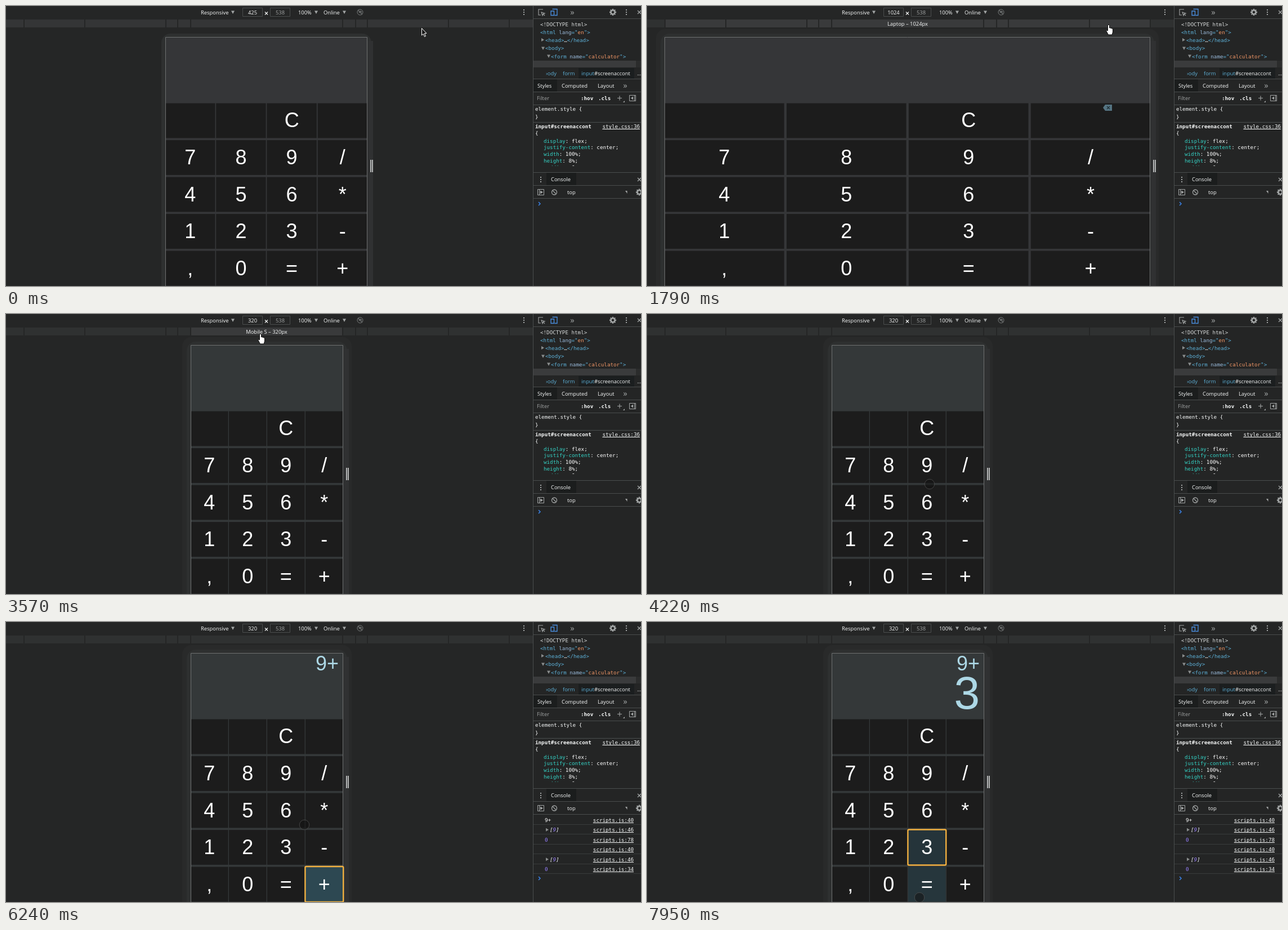
Write an HTML page with a canvas that moves like this. It is 1128x497 px and loops after 8000 ms.

```html
<!DOCTYPE html>
<html lang="en">
<head>
<meta charset="utf-8">
<title>Responsive calculator</title>
<style>
html, body { margin: 0; width: 100%; height: 100%; overflow: hidden; background: #242525; }
canvas { display: block; }
</style>
</head>
<body>
<canvas id="stage" width="1128" height="497"></canvas>
<script>
const ctx = document.getElementById('stage').getContext('2d');
const LOOP = 8000;
const UI = '9.4px "Open Sans", sans-serif';
const MONO = '9.23px "DejaVu Sans Mono", monospace';
const CALC = '36px "Liberation Sans", Arial, sans-serif';
const LINE = '#4a4d4d', GREY = '#a2a5a5', LIGHT = '#f8fafa';
const CENTER = 463, SCALE = 0.842;

// ---- timeline: each value holds until the next entry ----
const pointer = [
  [0, 'arrow', 738, 39], [130, 'hand', 758, 35], [250, 'hand', 778, 33], [390, 'arrow', 826, 25],
  [530, 'arrow', 826, 24], [830, 'hand', 826, 24], [980, 'hand', 825, 30], [1110, 'hand', 823, 35],
  [1360, 'hand', 820, 33], [2060, 'hand', 811, 34], [2200, 'arrow', 710, 44], [2330, 'arrow', 570, 49],
  [2460, 'arrow', 478, 50], [2600, 'arrow', 477, 51], [2750, 'arrow', 464, 44], [2880, 'hand', 454, 36],
  [3010, 'hand', 452, 35], [3830, 'touch', 466, 90], [3960, 'touch', 483, 190], [4090, 'touch', 497, 270],
  [4220, 'touch', 502, 302], [4480, 'touch', 502, 294], [4610, 'touch', 503, 286], [4740, 'touch', 503, 283],
  [5020, 'touch', 581, 398], [5160, 'touch', 587, 440], [5290, 'touch', 580, 475], [5700, 'touch', 579, 474],
  [5980, 'touch', 560, 464], [6120, 'touch', 530, 360], [6250, 'touch', 497, 264], [6370, 'touch', 500, 385],
  [6770, 'touch', 504, 398], [7170, 'touch', 503, 420], [7300, 'touch', 496, 455], [7420, 'touch', 488, 479],
  [7550, 'touch', 484, 489]
];
const viewport = [[0, 425], [1790, 1024], [3570, 320]];
const label = [[0, ''], [130, 'Tablet – 768px'], [390, ''], [980, 'Laptop – 1024px'], [2200, ''],
  [2880, 'Mobile S – 320px'], [3830, '']];
const focus = [[0, ''], [5020, '9'], [5980, '+'], [6910, '3']];
const big = [[0, ''], [5020, '9'], [5980, ''], [6910, '3']];
const hover = {
  '9': [[0, 0], [4880, 0.6], [5020, 1], [5840, 0.5], [5980, 0]],
  '+': [[0, 0], [5840, 0.5], [5980, 1], [6650, 0.5], [6770, 0.15], [6910, 0]],
  '3': [[0, 0], [6650, 0.5], [6770, 0.85], [6910, 1], [7950, 0.55]],
  '=': [[0, 0], [7950, 0.6]]
};
const at = (track, t) => track.findLast(entry => entry[0] <= t);

// ---- drawing helpers ----
function rect(x, y, w, h, color) {
  ctx.fillStyle = color;
  ctx.fillRect(x, y, w, h);
}
function box(x, y, w, h, color, lineWidth = 1, radius = 0) {
  ctx.strokeStyle = color;
  ctx.lineWidth = lineWidth;
  ctx.beginPath();
  ctx.roundRect(x, y, w, h, radius);
  ctx.stroke();
}
function text(s, x, y, color = LIGHT, font = UI, align = 'left') {
  ctx.font = font;
  ctx.fillStyle = color;
  ctx.textAlign = align;
  ctx.fillText(s, x, Math.round(y));
}
function spans(x, y, ...parts) {
  for (const [s, color, style = ''] of parts) {
    text(s, x, y, color, style + MONO);
    x += ctx.measureText(s).width;
  }
}
function link(s, right, y) {
  text(s, right, y, LIGHT, MONO, 'right');
  const w = ctx.measureText(s).width;
  rect(right - w, Math.round(y) + 1, w, 1, LIGHT);
}
function stroke(d, x, y, color = GREY, width = 1.1) {
  ctx.save();
  ctx.translate(x, y);
  ctx.strokeStyle = color;
  ctx.lineWidth = width;
  ctx.stroke(new Path2D(d));
  ctx.restore();
}
function shape(d, x, y, fill, outline) {
  ctx.save();
  ctx.translate(x, y);
  const path = new Path2D(d);
  ctx.fillStyle = fill;
  ctx.fill(path);
  if (outline) {
    ctx.strokeStyle = outline;
    ctx.lineWidth = 1;
    ctx.stroke(path);
  }
  ctx.restore();
}
const down = (x, y, color = GREY) => shape('M-3-2.5H3L0 3Z', x, y, color);
const right = (x, y) => shape('M-2-3V3L3 0Z', x, y, '#8a8d8d');
function dots(x, y) {
  for (const dy of [-4, 0, 4]) rect(x - 1, y + dy - 1, 2, 2, GREY);
}
function ring(x, y, r, color, width = 1) {
  ctx.strokeStyle = color;
  ctx.lineWidth = width;
  ctx.beginPath();
  ctx.arc(x, y, r, 0, 7);
  ctx.stroke();
}
function gear(x, y) {
  ring(x, y, 3.4, GREY, 2.4);
  for (let i = 0; i < 8; i++) {
    const a = i * Math.PI / 4;
    ctx.beginPath();
    ctx.moveTo(x + 4 * Math.cos(a), y + 4 * Math.sin(a));
    ctx.lineTo(x + 6 * Math.cos(a), y + 6 * Math.sin(a));
    ctx.stroke();
  }
}
const cross = (x, y) => stroke('M-3-3L3 3M3-3L-3 3', x, y, GREY, 1.3);

// ---- device toolbar and breakpoint ruler ----
function drawToolbar(t, width) {
  text('Responsive', 346, 15);
  down(403, 11);
  box(420.5, 3.5, 35, 15, LINE);
  text(width, 438, 15, LIGHT, UI, 'center');
  stroke('M-2.5-2.5L2.5 2.5M2.5-2.5L-2.5 2.5', 462.5, 13, LIGHT);
  box(469.5, 3.5, 35, 15, LINE);
  text('538', 487, 15, GREY, UI, 'center');
  text('100%', 519, 15);
  down(551, 11);
  text('Online', 564, 15);
  down(601, 11);
  ring(629, 11, 5, '#777a7a');
  stroke('M-4-4L4 4M-2 1L1-2L3 0', 629, 11, '#777a7a');
  dots(920, 11);

  rect(0, 24, 936, 14, t < 1790 ? '#343536' : '#2f3131');
  const name = at(label, t)[1];
  const range = name.match(/(\d+)px/);
  if (range) rect(CENTER - range[1] * SCALE / 2, 24, range[1] * SCALE, 14, '#393a3b');
  for (const w of [320, 375, 425, 768, 1024])
    for (const side of [-1, 1]) rect(Math.round(CENTER + side * w * SCALE / 2) - 1, 24, 2, 14, '#252626');
  text(name, CENTER, 35, LIGHT, UI, 'center');
}

// ---- calculator page ----
function drawDevice(t, width) {
  const w = width * SCALE + 1.2, left = Math.round(CENTER - w / 2), edge = Math.round(left + w);
  const panel = width === 320 ? '#343839' : '#353638';
  const frame = (pad, color) => {
    ctx.fillStyle = color;
    ctx.beginPath();
    ctx.roundRect(left - pad, 56 - pad, edge - left + 2 * pad, 600, 16);
    ctx.fill();
  };
  if (width !== 425) frame(15, '#292a2a');
  frame(7, '#2e3030');
  rect(edge, 62, 10, 435, '#303132');
  for (const dx of [5, 8]) rect(edge + dx, 273, 2, 22, '#b4b6b6');

  rect(left, 56, edge - left, 441, panel);
  const gap = w * 0.005, pitch = (w + gap) / 4, keyWidth = pitch - gap, keyHeight = 61.8;
  const keys = ['', '', 'C', '', ...'789/456*123-,0=+'];
  let focused;
  keys.forEach((key, i) => {
    const row = Math.floor(i / 4), x = left + i % 4 * pitch, y = 172.6 + row * 65.5;
    rect(x, y, keyWidth, keyHeight, '#1c1c1c');
    if (hover[key]) {
      ctx.globalAlpha = at(hover[key], t)[1];
      rect(x, y, keyWidth, keyHeight, '#2d4852');
      ctx.globalAlpha = 1;
    }
    text(key, x + keyWidth / 2, 215.2 + row * 65.75, '#fff', CALC, 'center');
    if (key && key === at(focus, t)[1]) focused = [x, y];
  });
  box(left + 0.5, 55.5, edge - left - 1, 500, '#6f7171');
  if (focused) box(focused[0] - 0.6, focused[1] - 0.6, keyWidth + 1.2, keyHeight + 1.2, '#f2b040', 2.4, 2);
  if (width === 1024) {
    shape('M-8 0L-4-5.5H8V5.5H-4Z', 818, 180.5, '#557482');
    stroke('M-1-2.5L4 2.5M4-2.5L-1 2.5', 818, 180.5, '#1c2a30');
  }
  if (t >= 5980) text('9+', 591, 86, '#add8e6', CALC, 'right');
  text(at(big, t)[1], 591, 153.5, '#add8e6', '82px "Liberation Sans", Arial, sans-serif', 'right');
}

// ---- developer tools ----
function drawTools(t) {
  const tag = '#5db0d7', attr = '#9bbbdc', value = '#f29766', prop = '#35d4c7';
  rect(936, 0, 192, 497, '#242525');
  rect(936, 0, 1, 497, LINE);

  stroke('M3-5H-5V5H-1M0 0L6 2L3 3L2 6ZM3 3L6 6', 951, 11);
  stroke('M-3-5.5H5.5V5.5H1M-5.5-2H0V5.5H-5.5Z', 973.5, 11, '#4a90e2', 1.3);
  text('»', 1006, 16, GREY, '15px "Open Sans", sans-serif', 'center');
  gear(1078, 11);
  dots(1102, 11);
  cross(1125, 11);
  rect(937, 22, 191, 1, LINE);

  spans(949, 36, ['<!DOCTYPE html>', '#d8dbdb']);
  spans(949, 50, ['<html', tag], [' lang', attr], ['="', tag], ['en', value], ['">', tag]);
  right(953, 60);
  spans(958, 64, ['<head>', tag], ['…', LIGHT], ['</head>', tag]);
  down(954, 75, '#8a8d8d');
  spans(958, 78, ['<body>', tag]);
  down(964, 89, '#8a8d8d');
  spans(968, 93, ['<form', tag], [' name', attr], ['="', tag], ['calculator', value], ['">', tag]);
  rect(937, 97, 191, 12, '#2b2c2c');
  rect(937, 97, 182, 12, '#3a3b3c');

  rect(1017, 110, 99, 19, '#1b1e1f');
  text('›ody', 959, 123, tag);
  text('form', 989, 123, tag);
  text('input', 1022, 123, tag);
  text('#screenaccont', 1022 + ctx.measureText('input').width, 123);
  text('…', 1121, 123);
  rect(937, 129, 191, 1, LINE);

  rect(937, 130, 42, 22, '#1b1d1d');
  text('Styles', 944, 145);
  text('Computed', 987, 145);
  text('Layout', 1051, 145);
  text('»', 1100, 146, GREY, '15px "Open Sans", sans-serif', 'center');
  rect(937, 152, 191, 1, LINE);
  text('Filter', 943, 167, GREY);
  spans(1021, 167, [':hov', LIGHT, 'bold ']);
  spans(1052, 167, ['.cls', LIGHT, 'bold ']);
  stroke('M-4 0H4M0-4V4', 1090, 163.5);
  shape('M0 0V-3L-3 0Z', 1099, 171, GREY);
  box(1107.5, 158.5, 11, 10, GREY);
  shape('M-2 0L2-3V3Z', 1112, 163.5, GREY);
  rect(1116, 159, 1, 9, GREY);
  rect(937, 175, 191, 1, LINE);

  spans(940, 186, ['element.style {', LIGHT]);
  spans(940, 200, ['}', LIGHT]);
  rect(937, 206, 191, 1, LINE);
  spans(940, 217, ['input#screenaccont', LIGHT, 'bold ']);
  link('style.css:36', 1126, 217);
  spans(940, 229, ['{', LIGHT]);
  ctx.save();
  ctx.beginPath();
  ctx.rect(937, 230, 191, 54);
  ctx.clip();
  const rules = ['display: flex', 'justify-content: center', 'width: 100%', 'height: 8%', 'padding: 0%'];
  rules.forEach((rule, i) => {
    const [name, setting] = rule.split(': ');
    spans(955, 242.5 + i * 11.8, [name, prop], [': ' + setting + ';', '#fff']);
  });
  ctx.restore();

  rect(937, 295, 191, 1, LINE);
  dots(950, 308);
  rect(960, 296, 53, 22, '#1b1d1d');
  text('Console', 968, 311);
  cross(1125, 308);
  rect(937, 318, 191, 1, LINE);
  box(944.5, 325.5, 11, 10, GREY);
  rect(947, 326, 1, 9, GREY);
  shape('M-2-3V3L3 0Z', 951, 330.5, GREY);
  ring(974, 330.5, 4.5, GREY, 1.3);
  stroke('M-3-3L3 3', 974, 330.5);
  text('top', 997, 334);
  shape('M-2-2H1.5V3Z', 1102, 330, GREY);
  gear(1125, 330.5);
  rect(937, 341, 191, 1, LINE);
  drawConsole(t >= 5980);
}

function drawConsole(filled) {
  const purple = '#9980ff';
  const rows = filled ? [['9+', 40], ['[9]', 46], ['0', 78], ['', 40], ['[9]', 46], ['0', 34]] : [];
  rows.forEach(([message, line], i) => {
    const y = 354.8 + i * 17.5;
    if (message === '[9]') {
      right(961, y - 3.5);
      spans(966, y, ['[', LIGHT, 'italic '], ['9', purple, 'italic '], [']', LIGHT, 'italic ']);
    } else {
      spans(957, y, [message, message === '0' ? purple : '#fff']);
    }
    link('scripts.js:' + line, 1115, y);
    rect(937, Math.round(y + 4), 191, 1, '#393c3c');
  });
  stroke('M-1.5-3L1.5 0L-1.5 3', 947.5, filled ? 455 : 351, '#3b82e8', 1.5);
}

function drawPointer([, kind, x, y]) {
  if (kind === 'arrow') {
    shape('M.5.5V13L3.5 10.5L5.5 15.5L7.5 14.5L5.5 9.5H9Z', x, y, '#161616', '#fff');
  } else if (kind === 'hand') {
    shape('M-1.5 1Q0-.5 1.5 1V6Q3 5 4 6.5Q6 6 7.5 8V13Q7 15 6 18H-.5L-4 11.5Q-3.5 9-1.5 11Z', x, y, '#fff', '#111');
  } else {
    ctx.fillStyle = 'rgba(18,18,18,.55)';
    ctx.beginPath();
    ctx.arc(x, y, 9, 0, 7);
    ctx.fill();
    ring(x, y, 8.7, 'rgba(110,110,110,.5)');
  }
}

function draw(now) {
  const t = now % LOOP;
  const width = at(viewport, t)[1];
  rect(0, 0, 1128, 497, '#252626');
  drawDevice(t, width);
  drawToolbar(t, width);
  drawTools(t);
  drawPointer(at(pointer, t));
  requestAnimationFrame(draw);
}
requestAnimationFrame(draw);
</script>
</body>
</html>
```
